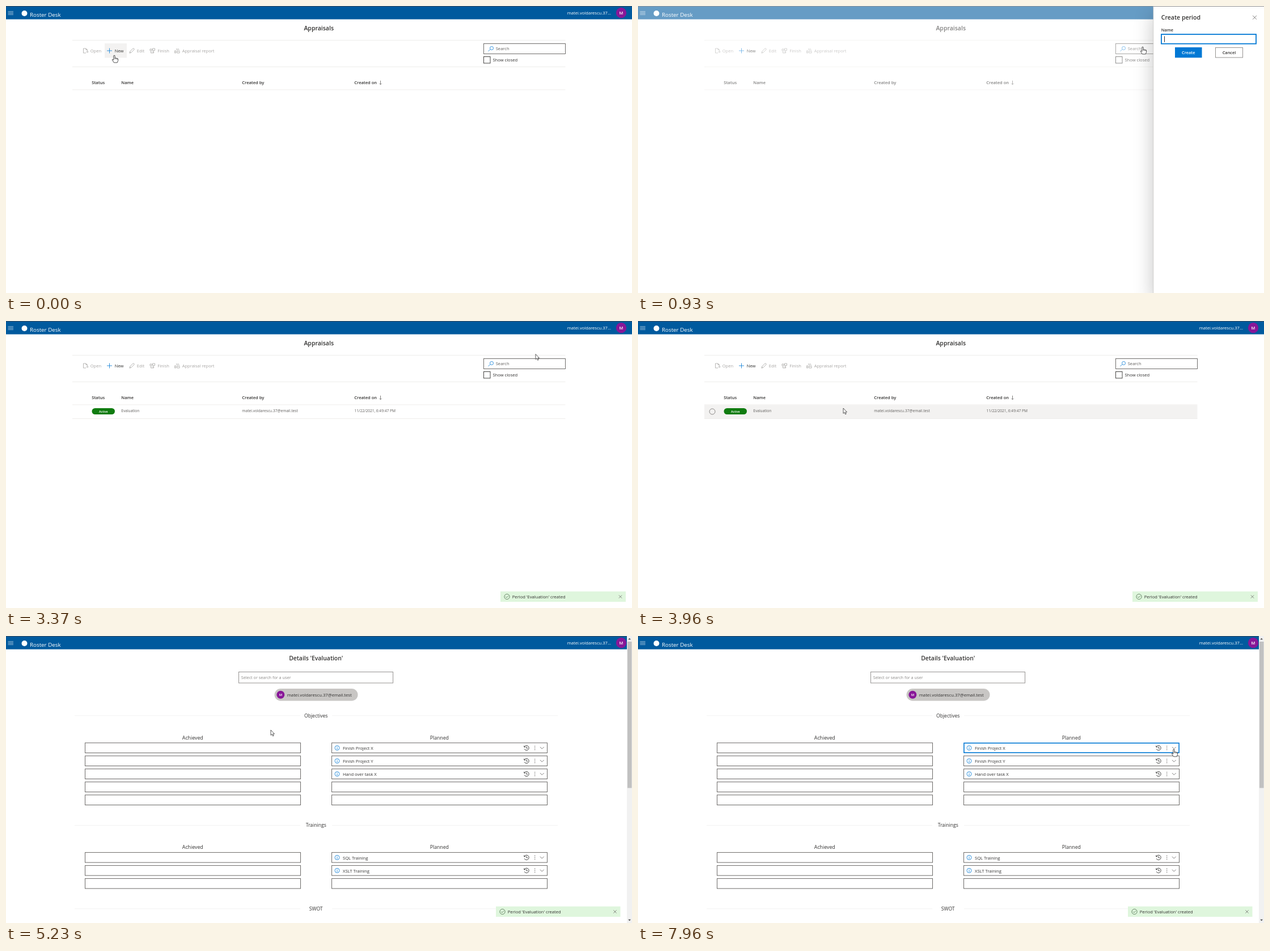
Write an HTML page with a canvas that moves like this. It is 1104 px wide and 507 px high and loops after 8000 ms.

```html
<!DOCTYPE html>
<html lang="en">
<head>
<meta charset="utf-8">
<title>Appraisals</title>
<style>
html, body { margin: 0; width: 100%; height: 100%; overflow: hidden; background: #fff; }
canvas { display: block; }
</style>
</head>
<body>
<canvas id="stage" width="1104" height="507"></canvas>
<script>
const c = document.getElementById('stage').getContext('2d');
const LOOP = 8000;
const BLUE = '#0078d4', DARK = '#323130', GREY = '#605e5c', PALE = '#a8a6a4', LINE = '#edebe9', PURPLE = '#881798';
const USER = 'matei.voldarescu.37', MAIL = USER + '@email.test';

// Pointer positions: [time, x, y]
const PATH = [
  [0, 191, 87], [450, 191, 87], [930, 890, 72], [1210, 934, 58.5], [3400, 934, 58.5],
  [3760, 683, 140], [3960, 362, 154], [4900, 362, 154], [5710, 650, 187], [5800, 650, 187],
  [6370, 675, 201], [6500, 675, 201], [7330, 724, 201], [7960, 945, 200], [LOOP, 945, 200]
];
const KEYS = [1470, 1740, 1844, 1948, 2053, 2157, 2261, 2366, 2470, 2670];

const clamp = v => Math.max(0, Math.min(1, v));
const smooth = v => v * v * (3 - 2 * v);

function text(s, x, y, size = 7.6, color = DARK, weight = 400, align = 'left') {
  c.font = `${weight} ${size}px "Open Sans", "Noto Sans", sans-serif`;
  c.textAlign = align;
  c.fillStyle = color;
  c.fillText(s, x, y);
}

function rect(x, y, w, h, color) {
  c.fillStyle = color;
  c.fillRect(x, y, w, h);
}

function frame(x, y, w, h, color, width = 1) {
  c.strokeStyle = color;
  c.lineWidth = width;
  c.strokeRect(x, y, w, h);
}

function pill(x, y, w, h, color) {
  c.fillStyle = color;
  c.beginPath();
  c.roundRect(x, y, w, h, h / 2);
  c.fill();
}

function disc(x, y, r, color) {
  pill(x - r, y - r, 2 * r, 2 * r, color);
}

function stroke(d, x, y, color, width = 0.8, fill) {
  const p = new Path2D(d);
  c.save();
  c.translate(x, y);
  if (fill) { c.fillStyle = fill; c.fill(p); }
  c.strokeStyle = color;
  c.lineWidth = width;
  c.lineJoin = 'round';
  c.stroke(p);
  c.restore();
}

const ring = r => `M${r} 0A${r} ${r} 0 1 1 ${-r} 0A${r} ${r} 0 1 1 ${r} 0`;
const cross = r => `M${-r} ${-r}L${r} ${r}M${r} ${-r}L${-r} ${r}`;

const POINTERS = {
  arrow: (x, y) => stroke('M0 0V9.3L2.1 7.4L3.6 10.8L5.2 10.1L3.7 6.9H6.5Z', x, y, '#333', 0.8, '#fff'),
  hand: (x, y) => stroke('M-1.2 .8Q0 -.6 1.1 .8V5Q2.5 4.1 3.3 5.3Q4.6 4.5 5.2 5.8Q6.5 5.3 6.6 6.8V9.5L5.2 13H-.6L-3.4 8.8Q-4.2 7.4 -2.9 7L-1.2 8.5ZM1.1 5V7M3.3 5.3V7.2M5.2 5.8V7.4',
    x, y, '#222', 0.8, '#fff'),
  beam: (x, y) => stroke('M-1.8 -4.5H-.5L0 -4L.5 -4.5H1.8M0 -4V4M-1.8 4.5H-.5L0 4L.5 4.5H1.8', x, y, '#222', 0.9)
};

function pointerAt(t) {
  const i = Math.max(1, PATH.findIndex(k => k[0] > t));
  const [a, b] = [PATH[i - 1], PATH[i]];
  const p = smooth((t - a[0]) / (b[0] - a[0]));
  return [a[1] + (b[1] - a[1]) * p, a[2] + (b[2] - a[2]) * p];
}

function pointerKind(t, x, y) {
  if (t < 3100) return x < 909 ? 'hand' : x < 923 ? 'arrow' : 'beam';
  if (t < 5800 || y < 189) return 'arrow';
  return x > 912 ? 'hand' : 'beam';
}

function header() {
  rect(0, 0, 1104, 23.5, '#005a9e');
  rect(0, 0, 1104, 1, '#33485c');
  stroke('M0 0H9.5M0 2.6H9.5M0 5.2H9.5', 3.5, 9.9, '#d5e3ef', 0.8);
  disc(32.5, 13, 5, '#fff');
  text('Roster Desk', 42, 19.3, 9.8, '#fff');
  text(USER + '...', 1067, 15.2, 7.6, '#fff', 400, 'right');
  disc(1085, 12, 9.2, PURPLE);
  text('M', 1085, 14.8, 7.4, '#fff', 600, 'center');
}

const TOOLS = [
  ['Open', 148.7, 136, 'M5 8.5H.5V.5H5L7.5 3V5M5 .5V3H7.5M5 6.5H9M7.5 5L9 6.5L7.5 8'],
  ['New', 191.7, 178, 'M4.5 0V9M0 4.5H9'],
  ['Edit', 230.7, 217.5, 'M.3 8.7L1 6L6.5 .5Q7.5 0 8.3 .8Q9 1.6 8.5 2.5L3 8ZM1 6L3 8'],
  ['Finish', 267.3, 253.5, 'M.5 1.5H3.5V4.5H.5ZM5 .5H9V4H5ZM2 5.5V8.5H7V5M4 6.5H7'],
  ['Appraisal report', 310.7, 297, 'M.5 4.5H2.5V8.5H.5ZM3 1.5H5V5M4.5 5.5H9V8.5H4.5ZM6.5 .5L8.5 4.5']
];

function listPage(t, x, y) {
  const hasRow = t >= 3240, selected = t >= 4220, hover = hasRow && t > 3600 && y > 148;
  text('Appraisals', 551.7, 43, 10.5, DARK, 600, 'center');
  for (const ly of [60, 107, 147.5]) rect(117, ly, 869.5, 0.9, LINE);
  if (t < 520) rect(174, 66, 39, 25.5, '#f3f2f1');
  TOOLS.forEach(([label, tx, ix, d], i) => {
    const on = i === 1 || selected;
    stroke(d, ix, 74.5, on ? BLUE : PALE, 0.8);
    text(label, tx, 81.7, 7.55, on ? DARK : PALE);
  });
  frame(842.5, 66.5, 144, 18, GREY, 0.9);
  stroke('M3.5 5.5L0 9M9 3.5A3 3 0 1 1 3 3.5A3 3 0 1 1 9 3.5', 850.5, 71, BLUE, 0.8);
  text('Search', 863.7, 78.3, 7.6, GREY);
  frame(842.5, 89.5, 11.5, 11.5, DARK, 0.9);
  text('Show closed', 858.4, 97.9);
  for (const [label, hx] of [['Status', 151.3], ['Name', 203.3], ['Created by', 416.3], ['Created on', 614.3]])
    text(label, hx, 137.5, 7.5, DARK, 600);
  stroke('M0 0V7M-2 5L0 7L2 5', 660.5, 131.8, GREY, 0.8);
  if (!hasRow) return;

  if (selected || hover) rect(117, 148.4, 869.5, 24, selected ? '#edebe9' : '#f3f2f1');
  rect(117, 172, 869.5, 0.9, LINE);
  if (selected) {
    disc(131, 160, 5.2, BLUE);
    stroke('M-2.4 0L-.6 1.8L2.6 -1.6', 131, 160, '#fff');
  } else if (hover) stroke(ring(5), 131, 160, GREY, 0.7);
  pill(151.5, 154, 40.5, 11, '#107c10');
  text('Active', 171.8, 162, 5.3, '#fff', 600, 'center');
  text('Evaluation', 203.3, 160.7, 6.6, GREY);
  text(MAIL, 416.3, 160.7, 6.65, GREY);
  text('11/22/2021, 6:49:47 PM', 614.5, 160.7, 6.6, GREY);
}

function field(x, y, label, state) {
  if (state === 'focus') frame(x + 0.9, y + 0.9, 379.2, 16.9, BLUE, 1.6);
  else frame(x + 0.5, y + 0.5, 380, 17.7, state === 'hover' ? '#201f1e' : '#6c6a68', 1);
  if (!label) return;
  const cy = y + 9.4;
  stroke(ring(4), x + 10, cy, BLUE, 0.8);
  stroke('M0 -.6V2.2M0 -2.2V-1.3', x + 10, cy, BLUE, 0.9);
  text(label, x + 20, cy + 3.3);
  stroke('M-3.8 -1.8A4.2 4.2 0 1 1 -3.8 1.8M-4.2 -4V-1.5H-1.8M0 -2.4V.5H2.2', x + 344, cy, DARK, 0.9);
  for (const dy of [-3, 0, 3]) disc(x + 358.7, cy + dy, 0.7, GREY);
  stroke('M-3.4 -1.7L0 1.7L3.4 -1.7', x + 371.3, cy, GREY, 0.8);
}

function divider(y, title) {
  rect(121, y - 3.2, 398, 0.8, '#f1f0ef');
  rect(575, y - 3.2, 398, 0.8, '#f1f0ef');
  text(title, 546.7, y, 8.6, DARK, 400, 'center');
}

function section(y, title, count, labels, state) {
  divider(y, title);
  text('Achieved', 329.3, y + 39, 8.8, DARK, 400, 'center');
  text('Planned', 764.3, y + 39, 8.7, DARK, 400, 'center');
  for (let i = 0; i < count; i++) {
    const fy = y + 44.7 + 23 * i;
    field(139, fy);
    field(574, fy, labels[i], i === 0 && state);
  }
}

function detailsPage(t) {
  const loaded = t >= 4960, shift = loaded ? 0 : -25;
  const state = t >= 6570 ? 'focus' : t >= 5860 ? 'hover' : '';
  text("Details 'Evaluation'", 546.7, 43, 10.4, DARK, 600, 'center');
  frame(410.5, 63.5, 272, 19.5, '#8a8886', 0.9);
  text('Select or search for a user', 414.7, 76.4, 7.25, '#8a8886');
  if (loaded) {
    pill(473.5, 93, 147, 21.5, '#c8c6c4');
    disc(484.3, 103.8, 7, PURPLE);
    text('M', 484.3, 106, 5.8, '#fff', 600, 'center');
    text(MAIL, 495.7, 106.7, 7.7);
  }
  section(143.6 + shift, 'Objectives', 5, loaded ? ['Finish Project X', 'Finish Project Y', 'Hand over task X'] : [], state);
  section(337.2 + shift, 'Trainings', 3, loaded ? ['SQL Training', 'XSLT Training'] : []);
  divider(484.6 + shift, 'SWOT');
}

function scrollbar(length) {
  rect(1095, 0, 9, 507, '#f1f1f1');
  rect(1096, 10, 7.5, length, '#c1c1c1');
  stroke('M-2 1.2L0 -1.2L2 1.2Z', 1099.6, 5, '#505050', 0.3, '#505050');
  stroke('M-2 -1.2L0 1.2L2 -1.2Z', 1099.6, 502, '#505050', 0.3, '#505050');
}

function toast(x, w) {
  rect(x, 477.7, w, 18.4, '#dff6dd');
  stroke(ring(4.6), x + 11.5, 487, '#4b6b4b', 0.8);
  stroke('M-2.3 0L-.6 1.7L2.4 -1.5', x + 11.5, 487, '#4b6b4b', 0.8);
  text("Period 'Evaluation' created", x + 20.8, 490, 7.6);
  stroke(cross(2.7), x + w - 9.5, 487, GREY, 0.7);
}

function panel(t) {
  const p = t < 3000 ? 1 - (1 - clamp((t - 450) / 367)) ** 4 : 1 - clamp((t - 3000) / 170);
  if (p <= 0) return;
  rect(0, 0, 1104, 507, `rgba(255,255,255,${0.4 * p})`);
  c.save();
  c.globalAlpha = p;
  c.translate((1 - p) * 23, 0);
  c.shadowColor = 'rgba(0,0,0,.24)';
  c.shadowBlur = 33;
  c.shadowOffsetY = 14;
  rect(909, 0, 220, 507, '#fff');
  c.shadowColor = 'transparent';
  rect(908.5, 0, 0.7, 507, '#c8c6c4');
  rect(909, 0, 195, 0.8, '#777');
  text('Create period', 922.7, 23.6, 10.55, DARK, 600);
  stroke(cross(3.4), 1087.5, 20.3, GREY, 0.8);
  text('Name', 922.7, 45, 7.4, DARK, 600);
  frame(923, 50, 167, 16.7, BLUE, 1.8);
  const typed = 'Evaluation'.slice(0, KEYS.filter(k => t >= k).length);
  text(typed, 927.9, 61.5);
  rect(928 + c.measureText(typed).width, 53.3, 0.9, 10.5, '#111');
  rect(947, 73, 47.5, 18.3, BLUE);
  text('Create', 970.7, 85.2, 7.4, '#fff', 600, 'center');
  frame(1018.5, 73.5, 48, 17.5, '#8a8886', 0.9);
  text('Cancel', 1042.5, 85.2, 7.4, DARK, 600, 'center');
  c.restore();
}

function draw() {
  const t = performance.now() % LOOP;
  const [x, y] = pointerAt(t);
  const details = t >= 4690;
  rect(0, 0, 1104, 507, '#fff');
  header();
  if (t < 4490) listPage(t, x, y);
  if (details) {
    detailsPage(t);
    scrollbar(t < 4960 ? 265 : 258.5);
  }
  if (t >= 3240) toast(details ? 864 : 872, details ? 219.5 : 221);
  panel(t);
  POINTERS[pointerKind(t, x, y)](x, y);
  requestAnimationFrame(draw);
}
draw();
</script>
</body>
</html>
```
